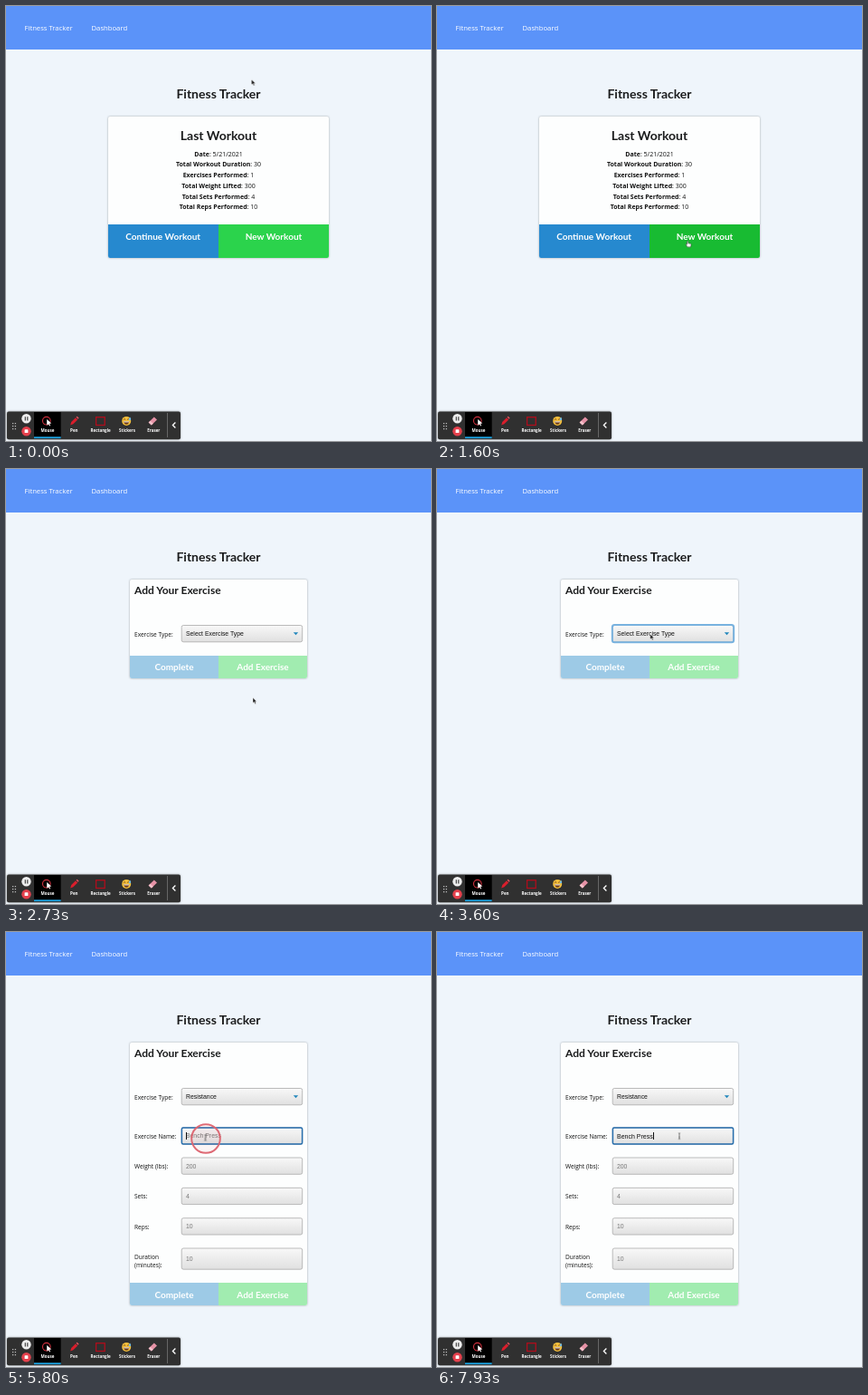
An HTML page for the animation above (8000 ms loop, 470 by 480 pixels).

```html
<!DOCTYPE html>
<html lang="en">
<head>
<meta charset="utf-8">
<title>Fitness Tracker</title>
<style>
html, body { margin: 0; width: 100%; height: 100%; overflow: hidden; background: #eff5fb; }
svg { position: absolute; left: 0; top: 0; display: block; }
text { font: 6.55px "Open Sans", sans-serif; fill: #111; }
.nav { font-size: 7.7px; fill: #fff; }
.title { font: 700 14px Lato, sans-serif; fill: #1b1c1d; }
.mid { text-anchor: middle; }
.small { font-size: 12px; }
.btn { font: 700 10px Lato, sans-serif; fill: #fff; text-anchor: middle; }
.row { font-size: 7px; text-anchor: middle; }
.row tspan { font-weight: 700; }
.value { font: 6.85px "Liberation Sans", Arial, sans-serif; }
.hint { fill: #777; }
.tool { font: 700 4.5px "Open Sans", sans-serif; fill: #fff; text-anchor: middle; }
.card { fill: #fdfefe; filter: drop-shadow(0 .6px 1.2px #0005); }
.field { fill: url(#face); stroke: #aaa; stroke-width: .8; }
.focus { fill: none; stroke: #286fae; stroke-width: 1.5; }
.pale-blue { fill: #9dcae6; }
.pale-green { fill: #a1ecb0; }

/* 1% of the loop is 80 ms */
.home, .form, .short, .long, .picked, .naming, .arrow, .hand, .beam, .hint-name, .caret, .typed::before {
  animation: 8s step-end infinite;
}
.home { animation-name: home; }
.form { animation-name: form; }
.short { animation-name: short; }
.long { animation-name: long; }
.picked { animation-name: picked; }
.naming { animation-name: naming; }
.arrow { animation-name: arrow; }
.hand { animation-name: hand; }
.beam { animation-name: beam; }
.hint-name { animation-name: hint; }
.caret { animation-name: naming; }
@keyframes home { 0% { visibility: visible } 28.25%, 100% { visibility: hidden } }
@keyframes form { 0% { visibility: hidden } 28.25%, 100% { visibility: visible } }
@keyframes short { 0% { visibility: hidden } 28.25% { visibility: visible } 61.6%, 100% { visibility: hidden } }
@keyframes long { 0% { visibility: hidden } 61.6%, 100% { visibility: visible } }
@keyframes picked { 0% { visibility: hidden } 43.9% { visibility: visible } 72.4%, 100% { visibility: hidden } }
@keyframes naming { 0% { visibility: hidden } 72.4%, 100% { visibility: visible } }
@keyframes hint { 0% { visibility: hidden } 61.6% { visibility: visible } 83.2%, 100% { visibility: hidden } }
@keyframes arrow { 0% { visibility: visible } 9.5% { visibility: hidden } 28.25% { visibility: visible } 67.5%, 100% { visibility: hidden } }
@keyframes hand { 0% { visibility: hidden } 9.5% { visibility: visible } 28.25%, 100% { visibility: hidden } }
@keyframes beam { 0% { visibility: hidden } 67.5%, 100% { visibility: visible } }

.new { animation: hover 8s linear infinite; }
@keyframes hover {
  0%, 9.5% { fill: #2bd34c }
  10.75%, 17.5% { fill: #22c43a }
  19%, 100% { fill: #18bb32 }
}
.cursor { animation: move 8s ease-in-out infinite; }
@keyframes move {
  0%, .75% { transform: translate(271.5px, 81px) }
  10.75%, 32.3% { transform: translate(277px, 259.3px) }
  34.1% { transform: translate(273px, 252.3px) }
  40.75%, 61.6% { transform: translate(235.7px, 182px) }
  69.1%, 75% { transform: translate(220.5px, 227px) }
  78.25%, 100% { transform: translate(268px, 225.2px) }
}
.ring { fill: #e0525f; fill-opacity: .06; stroke: #de6672; stroke-width: 2; animation: click 8s linear infinite; }
@keyframes click {
  0%, 17.49% { transform: translate(278px, 261px); opacity: 0 }
  17.5% { transform: translate(278px, 261px); opacity: 1 }
  19.9% { transform: translate(278px, 261px); opacity: .4 }
  20%, 43.2% { transform: translate(236px, 183px); opacity: 0 }
  43.25% { transform: translate(236px, 183px); opacity: 1 }
  44.9% { transform: translate(236px, 183px); opacity: .5 }
  45%, 72.35% { transform: translate(221px, 228px); opacity: 0 }
  72.4% { transform: translate(221px, 228px); opacity: 1 }
  74.9% { transform: translate(221px, 228px); opacity: .4 }
  75%, 100% { transform: translate(221px, 228px); opacity: 0 }
}
.entry { position: absolute; left: 199px; top: 220.7px; font: 7px/9px "Liberation Sans", Arial, sans-serif; color: #111; white-space: pre; }
.typed::before { content: ""; animation-name: type; }
.caret { position: absolute; left: 100%; top: .3px; width: .8px; height: 8px; background: #111; }
@keyframes type {
  0% { content: "" }
  83.2% { content: "B" }
  85% { content: "Be" }
  86.6% { content: "Ben" }
  87.5% { content: "Benc" }
  88.3% { content: "Bench" }
  89.1% { content: "Bench " }
  90% { content: "Bench P" }
  92.5% { content: "Bench Pr" }
  94.9% { content: "Bench Pre" }
  97.5% { content: "Bench Pres" }
  99.1%, 100% { content: "Bench Press" }
}
</style>
</head>
<body>
<svg width="470" height="480" viewBox="0 0 470 480">
  <defs>
    <linearGradient id="face" x2="0" y2="1">
      <stop stop-color="#f8f8f8"/><stop offset="1" stop-color="#e0e0e0"/>
    </linearGradient>
  </defs>
  <rect width="470" height="480" fill="#eff5fb"/>
  <rect width="470" height="48" fill="#5b93f9"/>
  <text class="nav" x="20.5" y="27.2">Fitness Tracker</text>
  <text class="nav" x="94.5" y="27.2">Dashboard</text>
  <text class="title mid" x="235" y="101.5">Fitness Tracker</text>

  <g class="home">
    <rect class="card" x="113" y="122" width="244" height="156" rx="2"/>
    <text class="title mid" x="235" y="148">Last Workout</text>
    <text class="row" x="235" y="165.5"><tspan>Date</tspan>: 5/21/2021</text>
    <text class="row" x="235" y="177.3"><tspan>Total Workout Duration</tspan>: 30</text>
    <text class="row" x="235" y="189"><tspan>Exercises Performed</tspan>: 1</text>
    <text class="row" x="235" y="200.8"><tspan>Total Weight Lifted</tspan>: 300</text>
    <text class="row" x="235" y="212.5"><tspan>Total Sets Performed</tspan>: 4</text>
    <text class="row" x="235" y="224.3"><tspan>Total Reps Performed</tspan>: 10</text>
    <path d="M113 241h122v37H115q-2 0-2-2z" fill="#2689cf"/>
    <path class="new" d="M235 241h122v35q0 2-2 2H235z"/>
    <text class="btn" x="173.7" y="257.6">Continue Workout</text>
    <text class="btn" x="296" y="257.6">New Workout</text>
  </g>

  <g class="short">
    <rect class="card" x="137" y="122" width="196" height="109" rx="2"/>
    <path class="pale-blue" d="M137 206h98v25h-96q-2 0-2-2z"/>
    <path class="pale-green" d="M235 206h98v23q0 2-2 2h-96z"/>
    <text class="btn" x="186" y="222.2">Complete</text>
    <text class="btn" x="284" y="222.2">Add Exercise</text>
  </g>

  <g class="long">
    <rect class="card" x="137" y="122" width="196" height="290" rx="2"/>
    <path class="pale-blue" d="M137 387h98v25h-96q-2 0-2-2z"/>
    <path class="pale-green" d="M235 387h98v23q0 2-2 2h-96z"/>
    <text class="btn" x="186" y="403.5">Complete</text>
    <text class="btn" x="284" y="403.5">Add Exercise</text>
    <text x="142" y="227.8">Exercise Name:</text>
    <text x="142" y="261">Weight (lbs):</text>
    <text x="142" y="294.3">Sets:</text>
    <text x="142" y="327.5">Reps:</text>
    <text x="142" y="360.7">Duration</text>
    <text x="142" y="370">(minutes):</text>
    <rect class="field" x="194.2" y="215.8" width="133.5" height="18.3" rx="2"/>
    <rect class="field" x="194.2" y="249" width="133.5" height="18.3" rx="2"/>
    <rect class="field" x="194.2" y="282.3" width="133.5" height="18.3" rx="2"/>
    <rect class="field" x="194.2" y="315.7" width="133.5" height="18.3" rx="2"/>
    <rect class="field" x="194.2" y="349" width="133.5" height="23.2" rx="2"/>
    <text class="value hint" x="199" y="260.6">200</text>
    <text class="value hint" x="199" y="294">4</text>
    <text class="value hint" x="199" y="327.3">10</text>
    <text class="value hint" x="199" y="363.2">10</text>
  </g>
  <text class="value hint hint-name" x="199" y="227.4">Bench Press</text>
  <rect class="focus naming" x="194.4" y="216" width="133.2" height="18" rx="1.5"/>

  <g class="form">
    <text class="title small" x="142" y="138">Add Your Exercise</text>
    <text x="142" y="184.6">Exercise Type:</text>
    <rect class="field" x="194.2" y="172.5" width="133.5" height="18.3" rx="2"/>
    <path d="M317.8 180.2h5.4l-2.7 3z" fill="#2488bd"/>
  </g>
  <rect class="picked" x="193.8" y="172" width="134.4" height="19.2" rx="2.5" fill="none" stroke="#78b2df" stroke-width="2"/>
  <text class="value short" x="199" y="184.2">Select Exercise Type</text>
  <text class="value long" x="199" y="184.2">Resistance</text>

  <g>
    <rect x="1" y="447.5" width="192" height="30.8" rx="2" fill="#303030" style="filter:drop-shadow(0 .5px 1px #0006)"/>
    <rect x="31" y="448" width="29.7" height="29" fill="#000"/>
    <rect x="31" y="475.3" width="29.7" height="1.8" fill="#1ca2e0"/>
    <path d="M7.6 460v8M10.4 460v8" stroke="#bbb" stroke-width="1.3" stroke-dasharray="1.3 1.7"/>
    <circle cx="22.5" cy="455.3" r="5.2" fill="#eee"/>
    <path d="M21.3 453.2v4.2M23.8 453.2v4.2" stroke="#333" stroke-width="1.1"/>
    <circle cx="22.5" cy="469.2" r="5.2" fill="#e5404c"/>
    <rect x="20.6" y="467.3" width="3.8" height="3.8" rx=".4" fill="#fff"/>
    <circle cx="44.8" cy="457.7" r="4.3" fill="none" stroke="#d0303e" stroke-width="1.1"/>
    <path d="M45.2 456l5 4.6-2.2.2 1.1 2.3-1 .5-1.1-2.4-1.8 1.5z" fill="#fff"/>
    <path d="M71.2 462.4l1-3.3 4.8-4.9 2.2 2.2-4.8 4.8z" fill="#d81e2c"/>
    <path d="M77.6 453.6l1-.9 2 2-1 1z" fill="#ee5560"/>
    <rect x="99.6" y="453.7" width="9.6" height="8.8" fill="none" stroke="#b00d1c" stroke-width="1.3"/>
    <circle cx="133.2" cy="457.9" r="5" fill="#f6c13c"/>
    <path d="M130 458.3h6.4q-.6 3.4-3.2 3.4t-3.2-3.4z" fill="#6d3b19"/>
    <path d="M130.2 458.4h6v1h-6z" fill="#fff"/>
    <path d="M129.8 456.6l1.3-1 1.3 1M134 456.6l1.3-1 1.3 1" fill="none" stroke="#6d3b19" stroke-width=".8"/>
    <path d="M137 453.5q2 2.5.6 3.4t-1.8-.5z" fill="#66b9ed"/>
    <path d="M157.6 459.6l6.2-6 3.2 3-6.2 6z" fill="#e692a6"/>
    <path d="M157.6 459.6l2-1.9 3.2 3-2 1.9z" fill="#f4c3cc"/>
    <text class="tool" x="46" y="470.4">Mouse</text>
    <text class="tool" x="75.3" y="470.4">Pen</text>
    <text class="tool" x="104.6" y="470.4">Rectangle</text>
    <text class="tool" x="134" y="470.4">Stickers</text>
    <text class="tool" x="163.3" y="470.4">Eraser</text>
    <path d="M178.5 449v27" stroke="#777" stroke-width=".8"/>
    <path d="M187.4 459.5l-3 3 3 3" fill="none" stroke="#fff" stroke-width="1.3"/>
  </g>
</svg>

<div class="entry"><span class="typed"></span><i class="caret"></i></div>

<svg width="470" height="480" viewBox="0 0 470 480">
  <circle class="ring" r="15.8"/>
  <g class="cursor">
    <path class="arrow" d="M0 0v6l1.4-1.2 1 2.2 1.1-.5-1-2.1h1.8z" fill="#111" stroke="#fff" stroke-width=".5"/>
    <path class="hand" d="M-.5.5q.7-1 1.3 0v2l2.7.5q.8.3.6 1.3l-.6 2.4H.1L-1.9 4q0-.9.8-.6l.6.5z" fill="#fff" stroke="#222" stroke-width=".5"/>
    <path class="beam" d="M-1.2-3.3Q0-3.3 0-2.5 0-3.3 1.2-3.3M0-2.5v5M-1.2 3.3Q0 3.3 0 2.5 0 3.3 1.2 3.3M-.7 1h1.4" fill="none" stroke="#555" stroke-width=".7"/>
  </g>
</svg>
</body>
</html>
```
